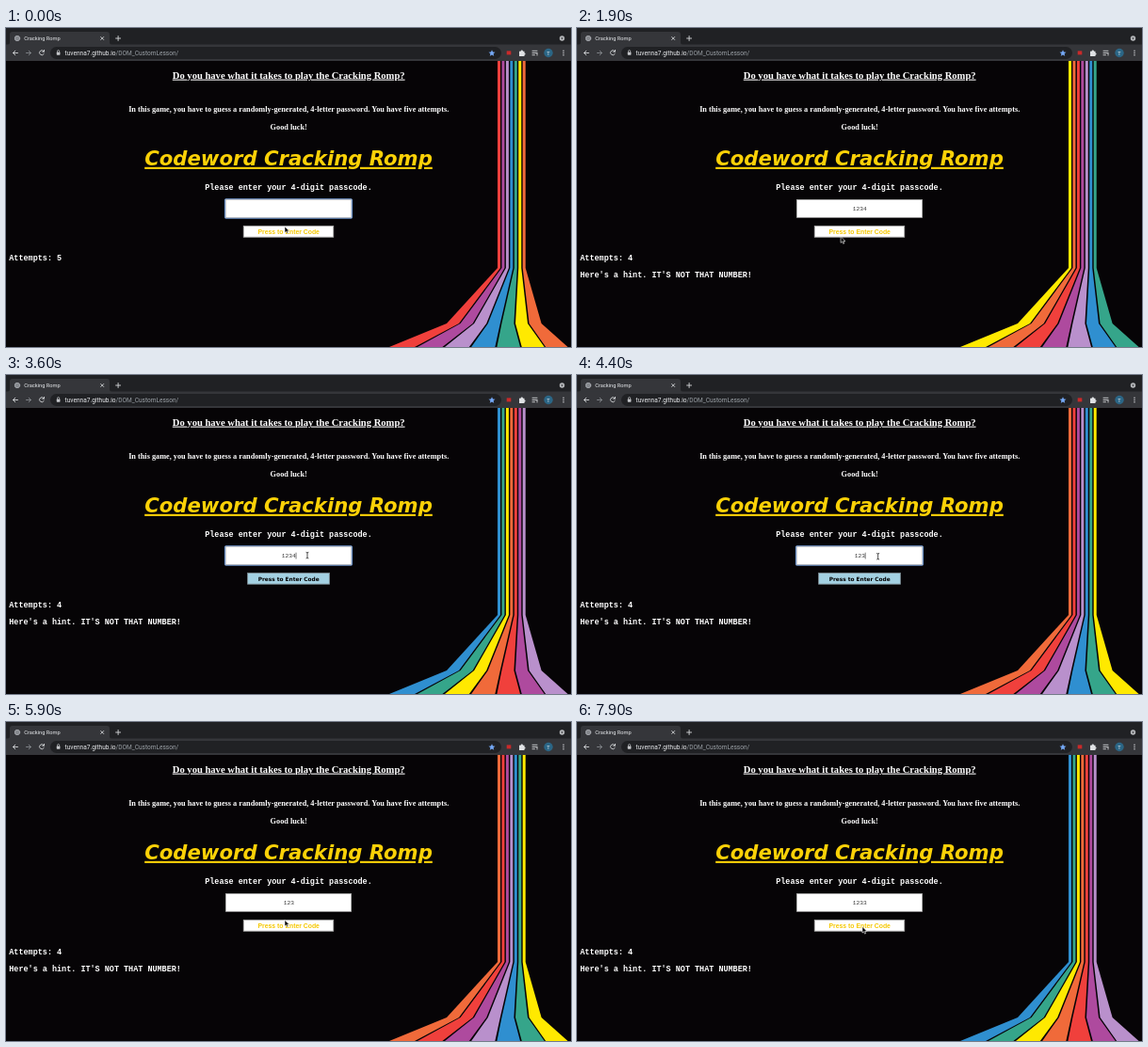
Write an HTML page that moves like this. It is 600 px wide and 339 px high and loops after 8000 ms.

```html
<!DOCTYPE html>
<html lang="en">
<head>
<meta charset="utf-8">
<title>Cracking Romp</title>
<style>
  html, body { margin: 0; width: 100%; height: 100%; overflow: hidden; background: #060406; }
  svg { display: block; width: 100vw; height: 100vh; }
  .ui { font-family: Roboto, "Open Sans", sans-serif; fill: #e8eaed; }
  .serif { font: bold 8.25px "Liberation Serif", serif; fill: #fff; text-anchor: middle; }
  .lead { font-size: 10.58px; text-decoration: underline; }
  .title { font: italic bold 21.2px "DejaVu Sans", sans-serif; fill: #fbd107;
           text-anchor: middle; text-decoration: underline; }
  .mono { font: bold 8.46px "Liberation Mono", monospace; fill: #fff; }
  .mid { text-anchor: middle; }
  .entry { font: 6.2px "Liberation Mono", monospace; fill: #333; text-anchor: middle; }
  .button rect { fill: #a3d1e2; stroke: #7b8b92; }
  .button text { font: bold 5.84px "DejaVu Sans", sans-serif; text-anchor: middle; }
  .button.hover rect { fill: #fff; stroke: #aaa; }
  .button.hover text { font: bold 6.85px "Liberation Sans", sans-serif; fill: #f5c800; }
  .line { fill: none; stroke: #d5d7da; stroke-width: .9; stroke-linecap: round; }
</style>
</head>
<body>
<svg viewBox="0 0 600 339" preserveAspectRatio="none">
  <rect width="600" height="339" fill="#060406"/>
  <g id="stripes"></g>

  <!-- browser frame -->
  <rect width="600" height="18" fill="#202124"/>
  <path d="M1 18Q4 18 4 15V7Q4 4 7 4H107Q110 4 110 7V15Q110 18 113 18Z" fill="#35363a"/>
  <rect y="17.5" width="600" height="17.5" fill="#35363a"/>
  <g class="line">
    <circle cx="12" cy="11" r="2.7" fill="#85888d" stroke="#a5a8ad"/>
    <path d="M100.7 9.5l3 3m0-3l-3 3M116.6 11h5M119.1 8.5v5"/>
    <path d="M12.5 26.5H7.5l2.3-2.3M7.5 26.5l2.3 2.3"/>
    <path d="M21.5 26.5h5l-2.3-2.3M26.5 26.5l-2.3 2.3" stroke="#85888d"/>
    <path d="M40 24.6a2.5 2.5 0 1 0 .3 2.8M40.5 23.4v1.8h-1.8"/>
  </g>
  <circle cx="590.5" cy="11" r="2.7" fill="#b5b7ba"/>
  <path d="M589.2 10.4h2.6l-1.3 1.6z" fill="#202124"/>
  <rect x="47" y="20" width="479" height="13" rx="6.5" fill="#202124"/>
  <rect x="53.8" y="25.7" width="3.6" height="3" rx=".5" fill="#c5c7ca"/>
  <path class="line" d="M54.5 25.7v-1a1.1 1.1 0 0 1 2.2 0v1" style="stroke-width:.7"/>
  <path d="M516 23.2l1 2.3 2.5.2-1.9 1.6.6 2.5-2.2-1.4-2.2 1.4.6-2.5-1.9-1.6 2.5-.2z" fill="#75a9f7"/>
  <rect x="531.7" y="24.4" width="4.6" height="4" fill="#c92a2a"/>
  <path d="M545 24.8h1.6a1.2 1.2 0 0 1 2.4 0h1.5v1.7a1.1 1.1 0 0 1 0 2.2v1.2H545z" fill="#dfe1e4"/>
  <path class="line" d="M559 24.3h5M559 26.5h5M559 28.7h2.5M564 26.8v2.2"/>
  <circle cx="576" cy="26.5" r="4.7" fill="#2b6686"/>
  <g fill="#dfe1e4">
    <circle cx="592" cy="24.2" r=".7"/><circle cx="592" cy="26.5" r=".7"/><circle cx="592" cy="28.8" r=".7"/>
  </g>
  <g class="ui">
    <text x="19.2" y="12.9" font-size="5.7">Cracking Romp</text>
    <text x="62.6" y="28.8" font-size="6.55">tuvenna7.github.io<tspan fill="#9aa0a6">/DOM_CustomLesson/</tspan></text>
    <text x="576" y="28.6" font-size="5.6" class="mid">T</text>
  </g>

  <!-- page -->
  <text class="serif lead" x="300.2" y="53.6">Do you have what it takes to play the Cracking Romp?</text>
  <text class="serif" x="300.2" y="89">In this game, you have to guess a randomly-generated, 4-letter password. You have five attempts.</text>
  <text class="serif" x="300.2" y="108.2">Good luck!</text>
  <text class="title" x="300" y="145.8">Codeword Cracking Romp</text>
  <text class="mono mid" x="300" y="171.6">Please enter your 4-digit passcode.</text>
  <rect id="ring" x="232.6" y="181.8" width="134.8" height="20.2" rx="1" fill="#fff" stroke="#6f97cf" stroke-width="1.3"/>
  <rect x="233.3" y="182.4" width="133.4" height="19" fill="#fff" stroke="#aaa" stroke-width=".6"/>
  <text class="entry" id="entry" x="300.3" y="194.3"></text>
  <path id="caret" d="M0 188.7v6.8" stroke="#222" stroke-width=".6"/>
  <g class="button" id="button">
    <rect id="face" y="210.4" height="11.8" stroke-width=".9"/>
    <text x="300.2" y="218.6">Press to Enter Code</text>
  </g>
  <text class="mono" id="attempts" x="3.3" y="246.7"></text>
  <text class="mono" id="hint" x="3.3" y="264.6">Here's a hint. IT'S NOT THAT NUMBER!</text>

  <g id="pointer">
    <path id="arrow" d="M0 0V6.6L1.6 5.3 2.6 7.6 3.7 7.1 2.7 4.8H4.8Z" fill="#000" stroke="#fff" stroke-width=".6"/>
    <path id="beam" d="M-1.4-3.2Q0-3.2 0-2.2 0-3.2 1.4-3.2M0-2.4V2.6M-1.4 3.4Q0 3.4 0 2.4 0 3.4 1.4 3.4" fill="none" stroke="#222" stroke-width=".8"/>
  </g>
</svg>
<script>
  const LOOP = 8000, STRIPE_STEP = 200;
  const COLORS = ["#f0403c", "#ae4a9e", "#b990cc", "#2f8fd0", "#35a58a", "#ffe900", "#f06a3a"];
  const $ = id => document.getElementById(id);

  // [time, x, y] of the pointer tip
  const PATH = [
    [0, 296, 211], [350, 296, 211], [650, 297.7, 225], [1250, 297.7, 225], [1450, 302, 214],
    [1750, 302, 214], [2400, 142, 270], [2750, 142, 270], [3300, 320, 191], [3500, 320, 191.5],
    [4350, 320, 191.5], [4700, 314, 211.5], [5300, 314, 211.5], [5900, 296, 210.5],
    [6650, 296, 210.5], [6850, 308, 193], [7250, 308, 193], [7500, 303, 217.5], [8000, 303, 217.5]
  ];
  const TYPED = [[0, ""], [450, "1"], [600, "12"], [750, "123"], [900, "1234"], [4100, "123"], [7100, "1233"]];
  const FOCUS = [[0, true], [1600, false], [3400, true], [4800, false], [6900, true], [7550, false]];
  const ANSWERED = 1600;

  const valueAt = (list, t) => list.filter(k => k[0] <= t).pop()[1];

  function pointerAt(t) {
    const i = PATH.findIndex(k => k[0] > t);
    const [t0, x0, y0] = PATH[i - 1], [t1, x1, y1] = PATH[i];
    const p = (t - t0) / (t1 - t0), e = p * p * (3 - 2 * p);
    return [x0 + (x1 - x0) * e, y0 + (y1 - y0) * e];
  }

  const inside = (x, y, left, top, right, bottom) =>
    x >= left && x <= right && y >= top && y <= bottom;

  // each stripe drops straight, then fans out across two bends
  const stripes = COLORS.map((_, i) => {
    const rows = [
      [35, 522 + 4.45 * i, 3],
      [255, 522 + 4.45 * i, 3],
      [314, 468 + 14.6 * i, 13],
      [339, 407 + 30.4 * i - .45 * i * i, 27 - .6 * i]
    ];
    const left = rows.map(([y, x]) => [x, y]);
    const right = rows.map(([y, x, w]) => [x + w, y]).reverse();
    const shape = document.createElementNS("http://www.w3.org/2000/svg", "polygon");
    shape.setAttribute("points", [...left, ...right].join(" "));
    $("stripes").append(shape);
    return shape;
  });

  const show = (id, on) => $(id).setAttribute("visibility", on ? "visible" : "hidden");

  function draw(t) {
    const shift = 7 - Math.floor(t / STRIPE_STEP) % 7;
    stripes.forEach((s, i) => s.setAttribute("fill", COLORS[(i + shift) % 7]));

    const [x, y] = pointerAt(t);
    const hover = inside(x, y, 254, 210, 346, 222.5);
    const overInput = inside(x, y, 233, 182, 367, 202);
    $("pointer").setAttribute("transform", `translate(${x} ${y})`);
    show("arrow", !overInput);
    show("beam", overInput);

    const width = hover ? 95.4 : 86.8;
    $("button").classList.toggle("hover", hover);
    $("face").setAttribute("x", 300 - width / 2);
    $("face").setAttribute("width", width);

    const text = valueAt(TYPED, t), focus = valueAt(FOCUS, t);
    $("entry").textContent = text;
    $("caret").setAttribute("transform", `translate(${300.6 + text.length * 1.86} 0)`);
    show("caret", focus && text);
    show("ring", focus);

    $("attempts").textContent = "Attempts: " + (t < ANSWERED ? 5 : 4);
    show("hint", t >= ANSWERED);
  }

  const start = performance.now();
  function tick() {
    draw((performance.now() - start) % LOOP);
    requestAnimationFrame(tick);
  }
  tick();
</script>
</body>
</html>
```
